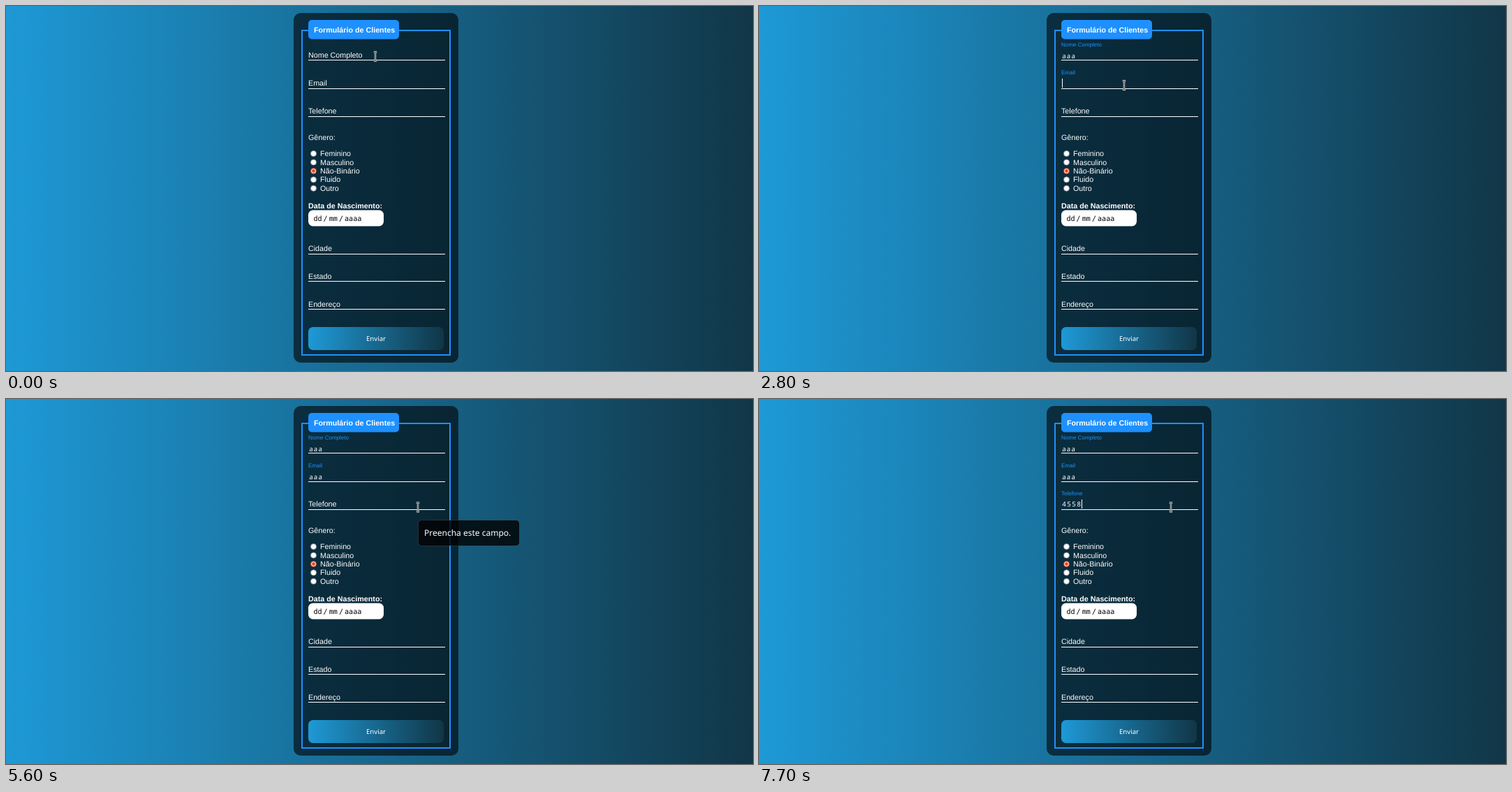
An HTML page that plays this animation: 1070 by 523 pixels, repeating every 8 s.

```html
<!DOCTYPE html>
<html lang="pt-BR">
<head>
<meta charset="utf-8">
<title>Formulário</title>
<style>
html, body { margin: 0; width: 100%; height: 100%; overflow: hidden; background: #113647; }
svg { display: block; width: 100vw; height: 100vh; }
text { font: 10.72px "Liberation Sans", Arial, sans-serif; fill: #fff; white-space: pre; text-rendering: geometricPrecision; }
.bold { font-weight: bold; }
.typed, .send { font: 9.6px "Noto Sans", sans-serif; }
.date { font: 10.1px "DejaVu Sans Mono", monospace; fill: #000; }
.tip text { font: 12px "Noto Sans", sans-serif; }
</style>
</head>
<body>
<svg id="stage" viewBox="0 0 1070 523" preserveAspectRatio="none">
  <defs>
    <linearGradient id="sea">
      <stop offset="0" stop-color="rgb(30,153,214)"/>
      <stop offset="1" stop-color="rgb(17,54,71)"/>
    </linearGradient>
  </defs>
  <rect width="1070" height="523" fill="url(#sea)"/>
  <rect x="412" y="10" width="236" height="501" rx="10" fill="#000" fill-opacity=".6"/>
  <rect x="424" y="35" width="212" height="465" fill="none" stroke="#1e90ff" stroke-width="2"/>
  <rect x="433" y="20" width="130" height="27.5" rx="5" fill="#1e90ff"/>
  <text class="bold" x="441" y="38">Formulário de Clientes</text>
  <text x="433" y="191.5">Gênero:</text>
  <text class="bold" x="433" y="290">Data de Nascimento:</text>
  <rect x="433" y="292.5" width="108" height="23" rx="6.7" fill="#fff"/>
  <text class="date" x="440.5" y="307.5">dd</text>
  <text class="date" x="454.5" y="307.5">/</text>
  <text class="date" x="462.7" y="307.5">mm</text>
  <text class="date" x="477" y="307.5">/</text>
  <text class="date" x="485" y="307.5">aaaa</text>
  <rect x="433" y="460" width="194" height="33" rx="6.7" fill="url(#sea)"/>
  <text class="send" x="530" y="479.7" text-anchor="middle">Enviar</text>
</svg>
<script>
const LOOP = 8000, STEP = 100;
const stage = document.getElementById('stage');

function add(tag, attrs, parent = stage, text = '') {
  const el = document.createElementNS('http://www.w3.org/2000/svg', tag);
  set(el, attrs);
  el.textContent = text;
  parent.appendChild(el);
  return el;
}
function set(el, attrs) {
  for (const k in attrs) el.setAttribute(k, attrs[k]);
}
const show = (el, on) => set(el, { visibility: on ? 'visible' : 'hidden' });
const mix = (a, b, p) => a + (b - a) * p;

// CSS "ease": cubic-bezier(.25, .1, .25, 1)
function ease(x) {
  if (x <= 0 || x >= 1) return x <= 0 ? 0 : 1;
  let lo = 0, hi = 1, u = .5;
  for (let i = 0; i < 24; i++) {
    u = (lo + hi) / 2;
    const bx = .75 * u * (1 - u) * (1 - u) + .75 * u * u * (1 - u) + u ** 3;
    if (bx < x) lo = u; else hi = u;
  }
  return .3 * u * (1 - u) ** 2 + 3 * u * u * (1 - u) + u ** 3;
}

['Feminino', 'Masculino', 'Não-Binário', 'Fluido', 'Outro'].forEach((name, i) => {
  const cy = 211.5 + i * 12.45, on = i === 2;
  const dot = (r, fill, extra) => add('circle', { cx: 440.5, cy, r, fill, ...extra });
  if (on) {
    dot(4.4, '#e2431e');
    dot(3.2, '#fff');
    dot(2.3, '#e2431e');
  } else {
    dot(4, '#fff', { stroke: '#8f8f9d', 'stroke-width': .8 });
  }
  add('text', { x: 450, y: cy + 3.6 }, stage, name);
});

function underline(y) {
  add('rect', { x: 433, y, width: 196, height: 1, fill: '#fff' });
}
[['Cidade', 351], ['Estado', 390.5], ['Endereço', 430.5]].forEach(([name, y]) => {
  add('text', { x: 433, y }, stage, name);
  underline(Math.round(y + 3.6));
});

// focus: label lift start; keys: typing times; caret: [on, off]
const fields = [
  { name: 'Nome Completo', base: 74, line: 77, top: 65, focus: 350, value: 'aaa', pitch: 6.7,
    spacing: 1.3, textY: 74.5, keys: [800, 900, 1000], caret: [[400, 1900]] },
  { name: 'Email', base: 114, line: 118, top: 104, focus: 2050, value: 'aaa', pitch: 6.7,
    spacing: 1.3, textY: 114.5, keys: [4100, 4400, 4500], caret: [[2100, 3300], [4100, 5100]] },
  { name: 'Telefone', base: 154, line: 158, top: 144, focus: 5650, value: '4558', pitch: 7.1,
    spacing: 1.6, textY: 154, keys: [6800, 7200, 7400, 7700], caret: [[5700, LOOP]] }
];
for (const f of fields) {
  underline(f.line);
  f.label = add('text', { x: 433 }, stage, f.name);
  f.typed = add('text', { class: 'typed', x: 434.2, y: f.textY, 'letter-spacing': f.spacing });
  f.bar = add('rect', { y: f.top, width: 1, height: 13, fill: '#fff' });
}

function popup(x, y, w, h, lines, times) {
  const el = add('g', { class: 'tip' });
  add('rect', { x: x + .5, y: y + .5, width: w - 1, height: h - 1, rx: 5, fill: '#000',
    'fill-opacity': .8, stroke: '#fff', 'stroke-opacity': .12 }, el);
  const row = h / lines.length;
  lines.forEach((s, i) => add('text', { x: x + 9, y: y + row * (i + .5) + 4 }, el, s));
  return { el, times };
}
const popups = [
  popup(523, 131, 183, 39, ['Informe um endereço de email.'], [[3100, 4100]]),
  popup(433, 121, 197, 56, ['abc', 'asd'], [[4300, 4400]]),
  popup(590, 173, 146, 38, ['Preencha este campo.'], [[5600, 5700], [6300, 6800]])
];

const beam = add('g', {});
const beamPath = 'M-2.2-6.3H-.8L0-5.6L.8-6.3H2.2M0-5.6V5.6M-2.2 6.3H-.8L0 5.6L.8 6.3H2.2';
add('path', { d: beamPath, fill: 'none', stroke: '#fff', 'stroke-width': 2.4 }, beam);
add('path', { d: beamPath, fill: 'none', stroke: '#000', 'stroke-width': .9 }, beam);
const arrow = add('path', {
  d: 'M.8 1V14L3.9 11.2L6.1 16.4L8.3 15.4L6.1 10.4H10.2Z',
  fill: '#000', stroke: '#fff', 'stroke-width': 1.1
});

// time, x, y, arrow shape
const moves = [
  [0, 529, 72.3], [100, 529, 71.5], [800, 530, 72], [900, 532, 73],
  [1000, 533, 73, 1], [1100, 527, 94, 1], [1200, 522, 115], [1500, 522.6, 117],
  [1900, 522, 115], [2600, 522, 114.5], [2800, 523, 113.5],
  [4700, 526, 115], [4800, 538, 121, 1], [4900, 553, 130, 1], [5000, 569, 140, 1],
  [5100, 584, 152], [5200, 590, 155]
];

const within = (t, spans) => spans.some(([a, b]) => t >= a && t < b);

function draw(t) {
  for (const f of fields) {
    const p = ease((t - f.focus) / 500);
    set(f.label, {
      y: mix(f.base, f.base - 16.3, p),
      style: `font-size:${mix(10.72, 8.04, p)}px;` +
        `fill:rgb(${mix(255, 30, p)},${mix(255, 144, p)},255)`
    });
    const n = f.keys.filter(k => k <= t).length;
    f.typed.textContent = f.value.slice(0, n);
    set(f.bar, { x: Math.round(434 + n * f.pitch) });
    show(f.bar, within(t, f.caret));
  }
  for (const p of popups) show(p.el, within(t, p.times));
  const [, x, y, pointing] = moves.filter(m => m[0] <= t).pop();
  for (const el of [beam, arrow]) set(el, { transform: `translate(${x} ${y})` });
  show(beam, !pointing);
  show(arrow, pointing);
}

const start = performance.now();
function tick() {
  const t = (performance.now() - start) % LOOP;
  draw(Math.floor(t / STEP) * STEP);
  requestAnimationFrame(tick);
}
tick();
</script>
</body>
</html>
```
